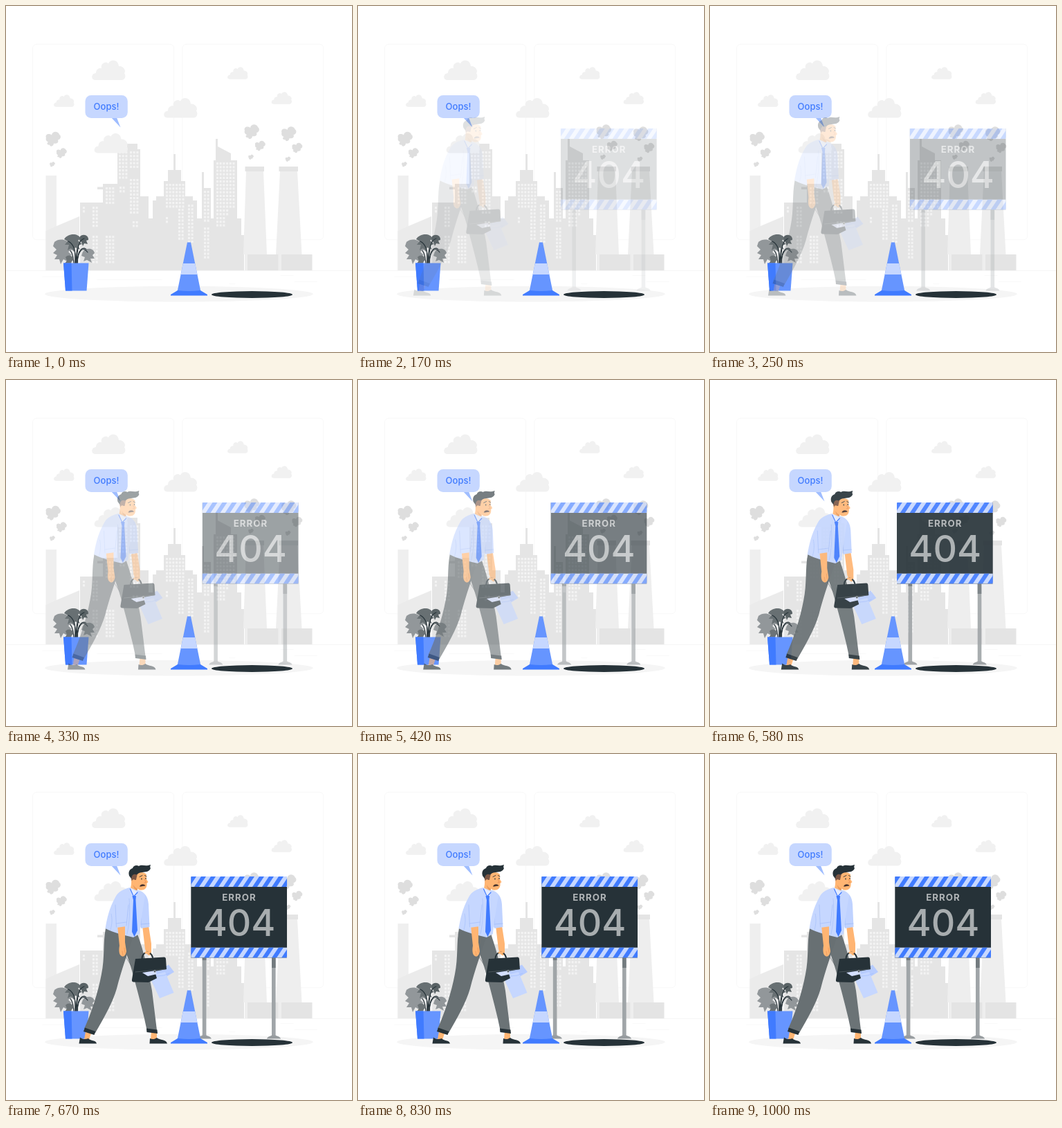
Write an HTML page with a canvas that moves like this. It is 500 px wide and 500 px high and loops after 1.04 s.

```html
<!DOCTYPE html>
<html lang="en">
<head>
<meta charset="utf-8">
<title>Error 404</title>
<style>
  html, body { margin: 0; width: 100%; height: 100%; overflow: hidden; background: #fff; }
  canvas { display: block; width: 500px; height: 500px; }
</style>
</head>
<body>
<canvas id="stage" width="500" height="500"></canvas>
<script>
const LOOP = 1040, FPS = 24, FRAMES = 25, SLIDE = 30;
const BLUE = '#407bff', MID = '#6695ff', PALE = '#c6d7ff', DARK = '#263238';
const SKIN = '#ffb573', FONT = 'Inter, "Open Sans", sans-serif';

const stage = document.getElementById('stage').getContext('2d');
const layer = document.createElement('canvas');
layer.width = layer.height = 500;
const sheet = layer.getContext('2d');
let g = stage;

function fill(color, d) {
  g.fillStyle = color;
  g.fill(new Path2D(d));
}

function line(color, width, d) {
  g.strokeStyle = color;
  g.lineWidth = width;
  g.lineCap = g.lineJoin = 'round';
  g.stroke(new Path2D(d));
}

function rect(color, x, y, w, h) {
  g.fillStyle = color;
  g.fillRect(x, y, w, h);
}

function oval(color, x, y, rx, ry) {
  g.fillStyle = color;
  g.beginPath();
  g.ellipse(x, y, rx, ry, 0, 0, Math.PI * 2);
  g.fill();
}

function stamp(color, d, x, y, scale) {
  g.save();
  g.translate(x, y);
  g.scale(scale, scale);
  fill(color, d);
  g.restore();
}

function label(text, font, color, x, y, spacing = '0px') {
  g.font = font + ' ' + FONT;
  g.letterSpacing = spacing;
  g.fillStyle = color;
  g.textAlign = 'center';
  g.fillText(text, x, y);
}

function lights(x, y, cols, rows) {
  for (let i = 0; i < cols; i++)
    for (let j = 0; j < rows; j++)
      rect('#f3f3f3', x + i * 4.7, y + j * 5.2, 3, 3.2);
}

function room() {
  rect('#fff', 0, 0, 500, 500);
  g.strokeStyle = '#f5f5f5';
  g.lineWidth = 0.7;
  for (const x of [38.5, 254.8]) {
    g.beginPath();
    g.roundRect(x, 55.2, 204, 282.6, 5.7);
    g.stroke();
  }
  rect('#ebebeb', 0, 382, 500, 0.5);
  const marks = [[416.8, 398.5, 33], [322.5, 401.2, 8.7], [396.6, 389.2, 19],
    [52.5, 390.9, 43], [104.6, 390.9, 6], [131.5, 395.1, 94]];
  for (const [x, y, w] of marks) rect('#ebebeb', x, y, w, 0.3);
}

function city() {
  // left works
  rect('#efefef', 57.5, 245, 15.5, 137);
  fill('#ebebeb', 'M57.5 325 L73 318 L106 304 V382 H57.5Z');
  // skyline
  fill('#e5e5e5', 'M107 382 V284 H140 V265 H132 V261.5 H140 V257 H161 V207 H175 V199 H190 V207 H194 V275 H206 V307 H212 V281 H217 V275 H228 V253 H234 V237 H242 V214 H245 V237 H253 V253 H259 V275 H270 V281 H276 V307 H283 V240 H286 V263 H296 V307 H300 V223 H303 V192 H306 V203 L325 213 V223 H334 V307 H340 V331 H344 V382Z');
  lights(111, 290, 1, 2);
  lights(125, 290, 2, 6);
  lights(125, 332, 2, 8);
  lights(144, 262, 3, 5);
  lights(144, 332, 3, 8);
  lights(163, 210, 3, 8);
  lights(179, 210, 3, 5);
  lights(179, 250, 3, 10);
  lights(164, 261, 2, 2);
  lights(183, 311, 2, 2);
  lights(231, 257, 6, 7);
  lights(249, 293, 2, 9);
  lights(231, 305, 1, 2);
  lights(263, 287, 2, 11);
  lights(286, 267, 2, 9);
  lights(286, 320, 2, 9);
  lights(304, 226, 6, 13);
  lights(304, 294, 4, 2);
  lights(304, 305, 3, 3);
  // cooling towers
  rect('#eeeeee', 345, 359, 97, 23);
  fill('#eeeeee', 'M347 239 H372 L377 359 H343Z M396 239 H421 L427.5 359 H390Z');
  rect('#e4e4e4', 345.5, 232, 27.5, 7);
  rect('#e4e4e4', 394.5, 232, 27.5, 7);
  rect('#e4e4e4', 349, 359, 44.5, 23);
  rect('#e4e4e4', 398, 359, 44.5, 23);
}

function sky() {
  const cloud = 'M5 29C-2 29-1 19 6 19C6 13 11 11 14 12C12 5 20 1 24 5C27-2 38-1 39 9C46 8 50 16 47 19C50 23 48 29 43 29Z';
  const clouds = [[124, 78, 1], [228, 132.5, 1], [127.5, 183.5, 1],
    [69, 128, 0.61], [320, 88, 0.61], [383.5, 124, 0.61]];
  for (const [x, y, s] of clouds) stamp('#f1f1f1', cloud, x, y, s);

  const puff = 'M1 9C-1 4 5 2 9 5C10-1 18-1 20 4C24 7 21 12 18 12C20 17 14 18 12 17C12 21 7 23 6 19C3 20 1 17 4 15C1 14 0 11 1 9Z';
  for (const [x, y] of [[57, 181.5], [344, 171], [397.5, 174]]) {
    stamp('#dedede', puff, x, y, 1);
    stamp('#dedede', puff, x + 15.5, y + 23.5, 0.7);
    stamp('#dedede', puff, x + 6, y + 43.5, 0.36);
  }
}

function ground() {
  oval('#f5f5f5', 250, 416.2, 193.9, 11.3);
  oval(DARK, 355.5, 417, 58.5, 5);
}

function plant() {
  line(DARK, 1.2, 'M100 372C101 355 98 344 91 341 M101 372C102 352 103 338 114 336 M103 372C103 352 112 344 119 355 M98 372C97 358 94 350 84 349');
  fill('#92979a', 'M70 341C77 335 88 337 92 344L96 352L90 355L95 360L88 363L90 370L83 366L79 373L77 366L70 366L74 360L68 357L73 352L68 347Z');
  fill('#687073', 'M84 337C90 328 104 328 108 336L104 339L110 344L104 346L107 352L100 349L98 355L94 350L89 353L91 345L85 345L89 340Z');
  fill('#596265', 'M107 333C112 328 120 332 119 338L116 339L118 344L113 343L111 347L109 341L106 339Z');
  fill('#92979a', 'M111 355C117 348 127 350 128 357L125 360L128 365L122 365L124 371L117 367L112 369L114 363L109 361Z');
  fill('#6c7376', 'M86 363C90 358 97 361 98 366L95 369L93 375L89 372L85 372L88 368Z');
  line(DARK, 1.1, 'M100 372C101 353 98 344 90 340 M102 372C103 350 105 338 113 336 M103 372C104 352 112 347 118 356');
  fill(MID, 'M83 371.5H119.5L116.5 411.5H86Z');
  fill(BLUE, 'M83 371.5H94.5L95.5 411.5H86Z');
}

function bubble() {
  fill('#9fbdff', 'M151 160 L165.5 175.5 L159.5 160Z');
  g.fillStyle = PALE;
  g.beginPath();
  g.roundRect(114.5, 129, 61.3, 33, 8.5);
  g.fill();
  label('Oops!', '500 13px', BLUE, 145, 149.5);
}

function cone() {
  fill(MID, 'M262 341.5H267L281.5 413H247.5Z');
  fill(PALE, 'M255.8 372H273.2L276.4 388H252.7Z');
  fill(BLUE, 'M238 417L248 411Q264.5 413 281 411L291 417V418.5H238Z');
}

function stripes(y) {
  g.save();
  g.beginPath();
  g.rect(267.3, y, 138.7, 15);
  g.clip();
  rect(PALE, 267, y, 140, 15);
  for (let x = 258; x < 410; x += 14)
    fill(BLUE, `M${x} ${y + 15}h7l10-15h-7Z`);
  g.restore();
}

function board() {
  for (const x of [283.8, 384]) {
    rect('#a0a5a8', x, 294, 5.6, 115);
    rect('#737b7f', x, 294, 5.6, x > 300 ? 15 : 4);
    fill('#979c9f', `M${x - 7} 411.5C${x - 6} 408 ${x - 2} 408 ${x} 406.5H${x + 5.6}C${x + 8} 408 ${x + 12} 408 ${x + 13} 411.5Z`);
  }
  rect(DARK, 267.3, 177, 138.7, 117.5);
  stripes(177);
  stripes(279.5);
  label('ERROR', '700 13.3px', '#b0b4b6', 337, 211.6, '1px');
  label('404', '500 53.5px', '#a8adaf', 337, 263);
}

function legs() {
  fill(SKIN, 'M210 400H218L218 413H209Z M115 401H124L120 413H113Z');
  fill(DARK, 'M208 411C212 413 215 412 218 410C222 414 232 412 233 418.5H207.5Z');
  fill(DARK, 'M107 409.5C112 413 115 412 119 411C122 415 130 413 131 418.5H105.5Z');
  fill('#6b7376', 'M163 258L190 260C200 288 207 320 211 342L218 399L204 401C199 376 192 350 185 324C179 300 171 281 163 258Z');
  fill('#687073', 'M144 252L184 262C178 282 167 311 160 339C154 360 140 384 129 403L113 397C123 375 133 345 138 318C143 294 140 273 144 252Z');
  line('#596164', 0.6, 'M168 285L181 306');
  fill(DARK, 'M203 396.5L218.5 398.5L219 404L203.5 402Z M114 395.5L129.5 401L127.5 406L112 401Z');
}

function head() {
  fill(SKIN, 'M181 176C186 170 198 169 203 174L203 181L205.5 185L203.5 187C204 192 202 196 197 196.5C194 197 191 196 189.5 194L190 204L179 196C182 190 181 183 181 176Z');
  fill('#e89a5c', 'M184 189C186 193 188 194 190 194.5L190 198C186 196 184 193 184 189Z');
  fill('#7c5644', 'M180 173L191 171C189 176 189 178 188 182L184 182L183 186C181 182 180 178 180 173Z');
  oval(SKIN, 184.5, 184.5, 2.5, 3.2);
  fill(DARK, 'M178 176C176 169 180 166 183 165C184 161 189 160 192 162C197 159 201 163 209 160C208 163 208 164 209 165C207 171 201 170 197 171C191 171 190 175 187 174C184 173 182 175 181 180Z');
  oval(DARK, 196, 180.5, 0.8, 1.1);
  oval(DARK, 202, 180, 0.7, 1.1);
  line(DARK, 0.9, 'M193 177.5L197 175.5 M200.5 175.5L203 177');
  line('#e07f45', 0.6, 'M200 181L202.5 185.5L200 186');
  fill('#43302c', 'M193 191.5C194 187.5 200 187 201.5 190.5C199 190.8 196 191.5 193 191.5Z');
}

function shirt() {
  fill(PALE, 'M179 193C170 195 162 199 158 207C149 223 146 238 143.5 252C155 258 171 262 184 265L193 260C194 244 198 225 201 204C198 199 193 196 188 197Z');
  fill('#e3ebff', 'M179 193L190 199L187 207L183 206Z');
  fill(BLUE, 'M182.5 205L188 205L187.5 211L190 255L185.5 264L182 257L184 211Z');
  line(BLUE, 1.2, 'M179.5 195L184.5 206L190 200');
  line('#a7c1fa', 0.7, 'M178 209C179 225 179 242 175 260 M152 231C154 239 153 247 151 254');
}

function briefcase() {
  line(DARK, 2.2, 'M196.5 296C197 285 209 283 212 294');
  fill('#b7ccff', 'M208 318L235 304.5L243 315L220 329Z');
  fill(PALE, 'M207 321L230 315L242.5 345L222 353Z');
  line('#9dbaff', 0.6, 'M209 322L228 320L236 317');
  fill(DARK, 'M187 296L229 293.5Q231 294 231 296L232 311L215 314L218 324L206 330L184 329.5Q181.5 329 182 326Z');
  fill('#d4dfff', 'M197 316L216 313L218 318L205 321Z');
  line('#596468', 0.7, 'M187 315L231 311');
  oval('#a0a5a8', 215, 314, 1.6, 2);
  oval(DARK, 215, 314, 0.8, 1.1);
}

function man() {
  legs();
  head();
  // far arm
  fill(SKIN, 'M197 248L206 248L210 274L210 286C210 291 207 293 204 289L201 282Z');
  fill('#bfd2ff', 'M193 198C202 201 205 207 206 217L207.5 250L195 252L193 228Z');
  line('#a0bcf8', 0.8, 'M195 246L207 245 M195 211L195 250');
  shirt();
  briefcase();
  line(SKIN, 3, 'M202 287L207 287');
  // near arm
  fill(SKIN, 'M161 248L172 248L172 272L174 285C173 291 170 294 167 292C163 290 163 283 164 277Z');
  line('#e58f51', 0.6, 'M168 285L169 291 M171 280L172 287');
  fill(PALE, 'M164 200C174 199 179 208 177 218L174 249L159.5 251L158 229C156 214 158 203 164 200Z');
  line('#a7c1fa', 0.8, 'M159 245L174 243 M158 218L159.5 250 M177 218L174 248');
}

// cubic-bezier(.36, -.01, .5, 1.38)
function ease(x) {
  const curve = (s, a, b) => 3 * (1 - s) * s * ((1 - s) * a + s * b) + s * s * s;
  let lo = 0, hi = 1;
  for (let i = 0; i < 30; i++) {
    const s = (lo + hi) / 2;
    if (curve(s, 0.36, 0.5) < x) lo = s; else hi = s;
  }
  return curve(lo, -0.01, 1.38);
}

function slideIn(draw, p, from) {
  if (p <= 0) return;
  sheet.clearRect(0, 0, 500, 500);
  sheet.save();
  sheet.translate(from * (1 - p), 0);
  g = sheet;
  draw();
  sheet.restore();
  g = stage;
  g.globalAlpha = Math.min(1, p);
  g.drawImage(layer, 0, 0);
  g.globalAlpha = 1;
}

function render(ms) {
  const step = Math.min(FRAMES - 1, Math.floor((ms + 5) * FPS / 1000));
  const p = step < 2 ? 0 : ease((step + 1) / FRAMES);
  room();
  city();
  sky();
  ground();
  plant();
  bubble();
  slideIn(board, p, SLIDE);
  cone();
  slideIn(man, p, -SLIDE);
}

const start = performance.now();
function tick() {
  render((performance.now() - start) % LOOP);
  requestAnimationFrame(tick);
}
tick();
</script>
</body>
</html>
```
